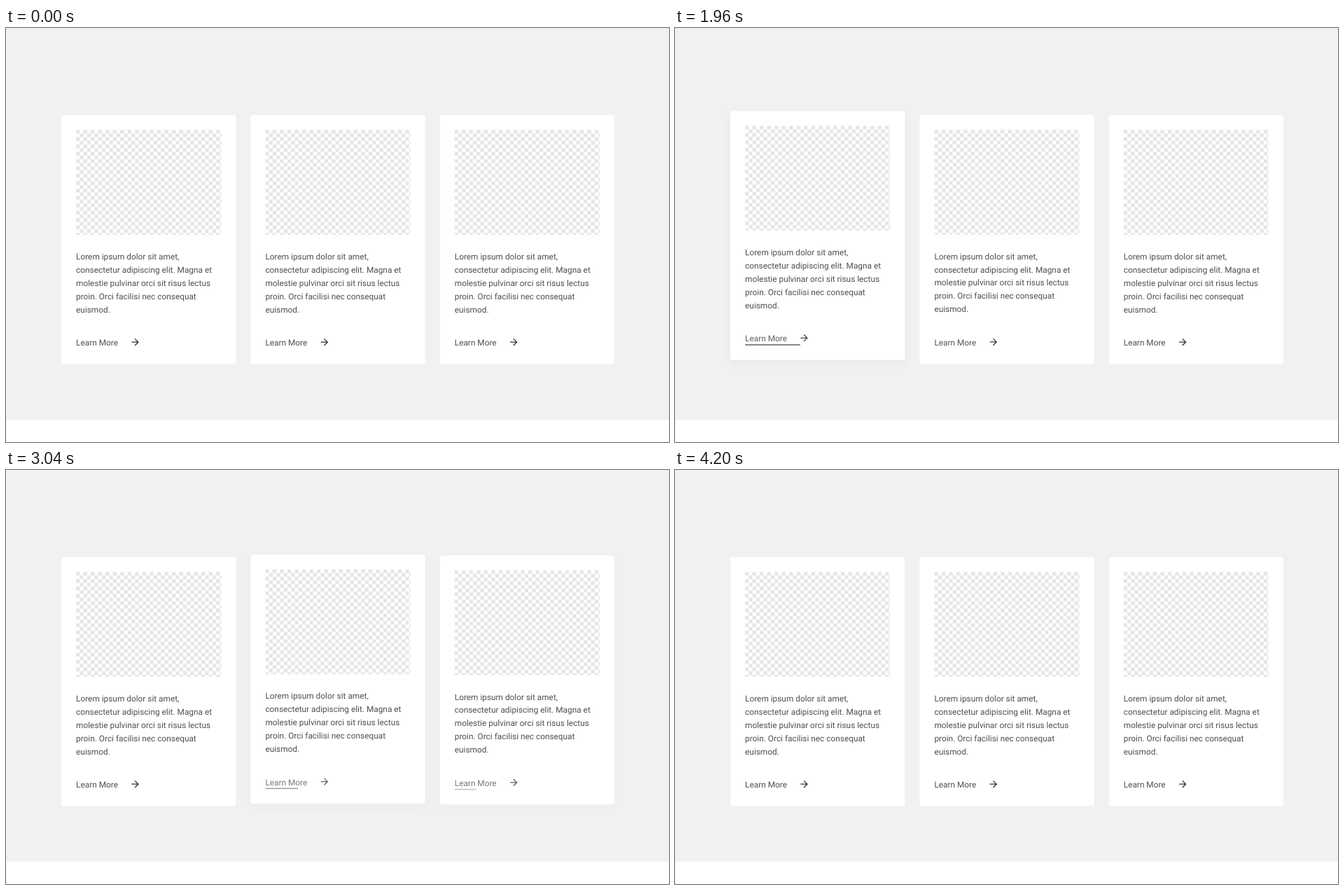
Write an HTML page that moves like this. It is 947 px wide and 592 px high and loops after 4.68 s.

```html
<!DOCTYPE html>
<html lang="en">
<head>
<meta charset="utf-8">
<title>Card hover</title>
<style>
  html, body { margin: 0; width: 100%; height: 100%; overflow: hidden; background: #f1f1f1; }
  svg { display: block; width: 947px; height: 592px; }
  text { font: 18px Roboto, sans-serif; fill: #4f4f4f; text-rendering: geometricPrecision; }
  .link { fill: #333; }
  .link text { font-size: 22px; font-weight: 500; fill: inherit; }
</style>
</head>
<body>
<svg viewBox="0 0 947 592">
  <defs>
    <pattern id="checker" width="16" height="16" x="32" y="32" patternUnits="userSpaceOnUse">
      <path d="M0 0h8v8h-8zM8 8h8v8h-8z" fill="#e5e5e5"/>
    </pattern>
    <g id="content">
      <rect x="32" y="32" width="314.67" height="228" fill="url(#checker)"/>
      <text y="313.4">
        <tspan x="32">Lorem ipsum dolor sit amet,</tspan>
        <tspan x="32" dy="28.8">consectetur adipiscing elit. Magna et</tspan>
        <tspan x="32" dy="28.8">molestie pulvinar orci sit risus lectus</tspan>
        <tspan x="32" dy="28.8">proin. Orci facilisi nec consequat</tspan>
        <tspan x="32" dy="28.8">euismod.</tspan>
      </text>
    </g>
    <g id="link">
      <text x="32" y="500.7">Learn More</text>
      <path transform="translate(148.4 481.2)" d="M12 4l-1.41 1.41L16.17 11H4v2h12.17l-5.58 5.59L12 20l8-8z"/>
    </g>
  </defs>
  <rect x="1" y="560" width="946" height="32" fill="#fff"/>
  <g id="cards" transform="scale(.6583)"></g>
</svg>
<script>
const LOOP = 4680, STEP = 40, FADE = 350, LIFT = 10, LINE = 134.5;
const hovers = [[832, 1936], [1953, 2928], [2961, 3846]]; // enter, leave

const cards = hovers.map(([enter, leave], i) => {
  const el = document.createElementNS('http://www.w3.org/2000/svg', 'g');
  el.innerHTML = `<rect class="panel" width="378.67" height="541" rx="5" fill="#fff"/>
    <use href="#content"/>
    <g class="link"><use href="#link"/></g>
    <rect class="line" x="32" y="507" height="2" fill="#333"/>`;
  document.getElementById('cards').append(el);
  const [panel, link, line] = ['.panel', '.link', '.line'].map(s => el.querySelector(s));
  return { el, panel, link, line, enter, leave, x: 120 + i * 410.67 };
});

// cubic-bezier(0, 0, .58, 1)
function easeOut(p) {
  if (p <= 0 || p >= 1) return p <= 0 ? 0 : 1;
  let lo = 0, hi = 1;
  for (let i = 0; i < 20; i++) {
    const s = (lo + hi) / 2;
    if (1.74 * s * s * (1 - s) + s ** 3 < p) lo = s; else hi = s;
  }
  return lo * lo * (3 - 2 * lo);
}

function draw(time) {
  for (const { el, panel, link, line, enter, leave, x } of cards) {
    const k = easeOut((time - enter) / FADE) - easeOut((time - leave) / FADE);
    el.setAttribute('transform', `translate(${x} ${189.1 - LIFT * k})`);
    panel.style.filter = k > 0 ? `drop-shadow(0 6px 9px rgba(0,0,0,${0.05 * k}))` : 'none';
    link.setAttribute('opacity', 1 - k * (1 - k)); // two label states cross-fading
    line.setAttribute('width', LINE * k);
    line.setAttribute('opacity', k);
  }
}

function tick() {
  draw(Math.floor(performance.now() % LOOP / STEP) * STEP);
  requestAnimationFrame(tick);
}
tick();
</script>
</body>
</html>
```
